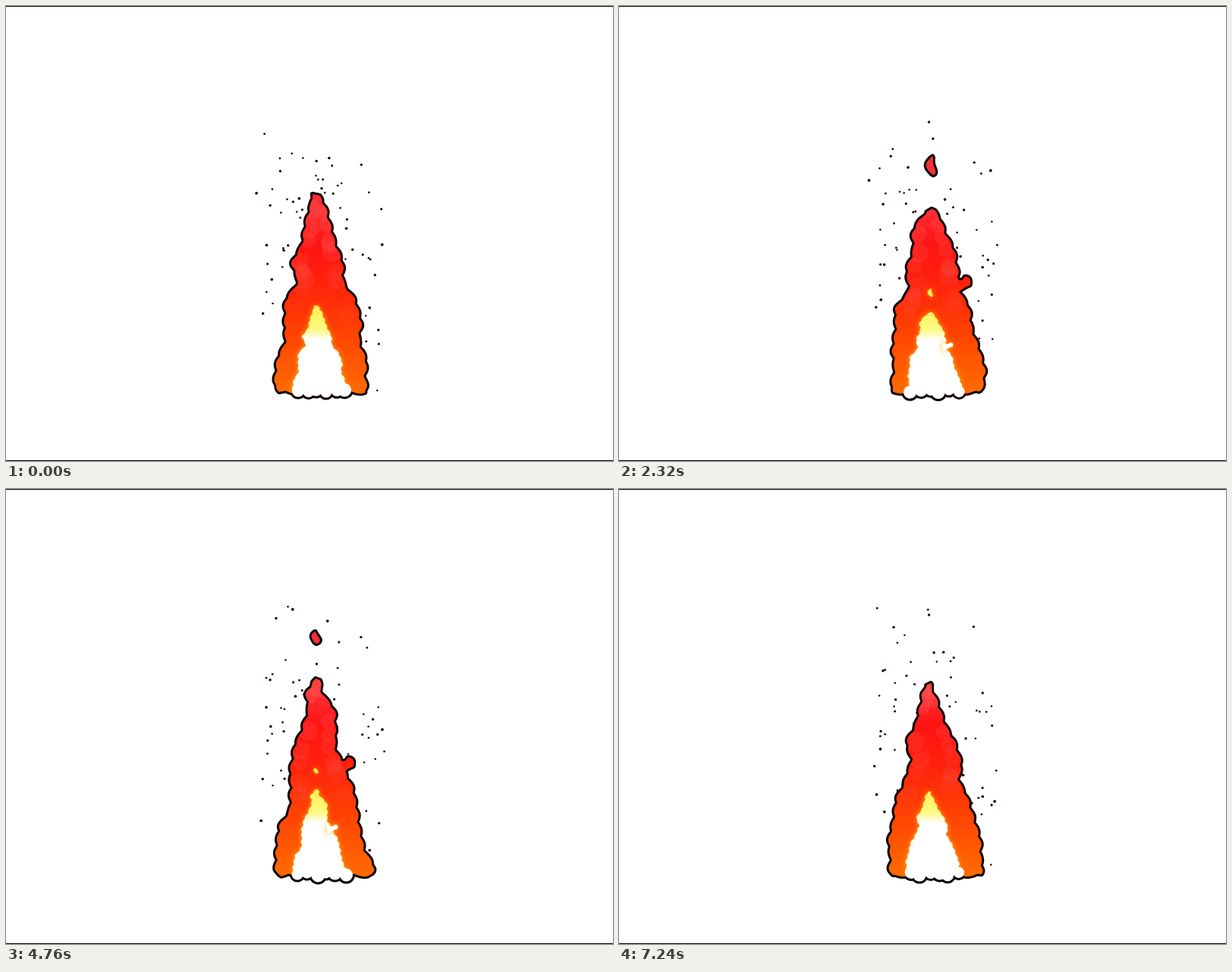
Animation, 800 px wide and 600 px high, one loop 7.28 s. Source, as an HTML page with a canvas:

```html
<!DOCTYPE html>
<html lang="en">
<head>
<meta charset="utf-8">
<title>Flame</title>
<style>
  html, body { margin: 0; width: 100%; height: 100%; overflow: hidden; background: #fff; }
  canvas { display: block; }
</style>
</head>
<body>
<canvas id="stage" width="800" height="600"></canvas>
<script>
const ctx = document.getElementById('stage').getContext('2d');
const LOOP = 7280, STEP = 40, RISE = 0.13, BASE = 511;

// Highest point of the flame, and the height of the lick that has just left it.
const keys = [
  { time: 0, x: 404, y: 246, lick: 0 },
  { time: 1640, x: 411, y: 254, lick: 16 },
  { time: 3040, x: 413, y: 268, lick: 64 },
  { time: 3880, x: 411, y: 264, lick: 54 },
  { time: 4760, x: 408, y: 248, lick: 16 },
  { time: 6000, x: 402, y: 239, lick: 0 },
  { time: 7240, x: 401, y: 206, lick: 0 }
];

let seed = 41;
const rand = () => (seed = (seed * 16807) % 2147483647) / 2147483647;
const clamp = (v, a, b) => Math.min(b, Math.max(a, v));
const mix = (a, b, u) => a + (b - a) * u;
const ease = u => u * u * (3 - 2 * u);
const hash = n => { const v = Math.sin(n * 127.1) * 43758.5; return v - Math.floor(v); };
const noise = x => {
  const i = Math.floor(x);
  return mix(hash(i), hash(i + 1), ease(x - i)) * 2 - 1;
};

// A lick leaves with every key, and a small one halfway between two keys.
const licks = keys.flatMap((k, i) => {
  const next = keys[i + 1];
  const own = { time: k.time, x: k.x, y: k.y - 22 - k.lick / 2 - (k.lick < 20 ? 22 : 0), h: k.lick };
  return next ? [own, { time: (k.time + next.time) / 2, x: (k.x + next.x) / 2, y: 208, h: 26 }] : [own];
}).filter(l => l.h);

const sparks = Array.from({ length: 64 }, () => {
  const x = 335 + rand() * 164;
  const high = x > 374 && x < 445;
  return {
    x, top: high ? 118 + rand() * 110 : 135 + rand() * 190,
    rise: 120 + rand() * 120, life: 1200 + rand() * 1200,
    phase: rand(), size: 1.2 + rand() * 0.7, sway: rand() * 6
  };
});
const patches = Array.from({ length: 16 }, (_, i) => ({
  side: i % 2 ? 0.84 : 0.16, phase: rand(), r: 9 + rand() * 6
}));

function flameAt(t) {
  const i = clamp(keys.findIndex(k => k.time > t) - 1, 0, keys.length - 2);
  const a = keys[i], b = keys[i + 1];
  const raw = clamp((t - a.time) / (b.time - a.time), 0, 1), u = ease(raw);
  const tipX = mix(a.x, b.x, u);
  const tipY = mix(a.y, b.y, u) + 20 * Math.sin(Math.PI * raw) * Math.sin(t / 150);

  const edge = (out, y) => {
    const s = (BASE - y) / 262;
    const half = Math.max(8, 66 * Math.max(0, 1 - s) ** 0.7);
    const flow = y + RISE * t;
    const bulge = noise(flow / 26 + out * 50) * Math.min(7, 1 + half * 0.2);
    const lobe = 3.2 * Math.abs(Math.sin(flow * Math.PI / 19 + out)) - 4;
    const sway = 6 * noise(flow / 24) * clamp(s - 0.55, 0, 1) * 2;
    const corner = 6 * clamp((y - 499) / 12, 0, 1) ** 2;
    const x = 419 - 11 * s + sway + out * (half + bulge + lobe - corner);
    return mix(tipX + out * 2, x, Math.sqrt(clamp((y - tipY) / 16, 0, 1)));
  };
  return { tipX, tipY, left: y => edge(-1, y), right: y => edge(1, y) };
}

function bodyPath(f, t) {
  const p = new Path2D();
  const top = f.tipY + 4;
  p.moveTo(f.tipX, f.tipY + 2);
  for (let y = top; y < BASE - 2; y += 2.5) p.lineTo(f.right(y), y);
  for (let x = f.right(BASE); x > f.left(BASE); x -= 3)
    p.lineTo(x, 507 + 4 * Math.abs(Math.sin((x + t / 60) / 9)));
  for (let y = BASE - 2; y > top; y -= 2.5) p.lineTo(f.left(y), y);
  p.closePath();
  return p;
}

function lickPath(l, t) {
  const dt = t - l.time, scale = 1 - Math.abs(dt) / 480;
  if (scale < 0.1) return null;
  const h = l.h * scale, half = (5 + l.h * 0.06) * scale;
  const p = new Path2D();
  const side = (out, k) => p.lineTo(
    l.x + 0.1 * h * Math.sin(k * 5 + l.time) + out * half * Math.sin(Math.PI * k) ** 0.6 * (0.55 + 0.5 * k),
    l.y - RISE * dt + h * (k - 0.5));
  for (let k = 0; k <= 1; k += 0.05) side(1, k);
  for (let k = 1; k >= 0; k -= 0.05) side(-1, k);
  p.closePath();
  return p;
}

// A hooked tongue that curls off the right flank together with a lick.
function curlPath(l, f, t) {
  const dt = t - l.time, scale = 1 - Math.abs(dt) / 480;
  if (scale < 0.1) return null;
  const y = 358 - RISE * dt, x = f.right(y) - 4;
  const at = (dx, dy) => [x + dx * scale, y + dy * scale];
  const p = new Path2D();
  p.moveTo(...at(-6, -8));
  p.quadraticCurveTo(...at(8, 8), ...at(13, -4));
  p.quadraticCurveTo(...at(23, -4), ...at(20, 8));
  p.quadraticCurveTo(...at(8, 12), ...at(-4, 26));
  p.closePath();
  return p;
}

function footPath(i, t) {
  const p = new Path2D();
  p.arc(385 + i * 12.4 + 1.5 * Math.sin(t / 210 + i * 2), 507.5 + 2 * Math.sin(t / 170 + i * 2.4),
    8 + Math.sin(t / 260 + i * 4), 0, 7);
  return p;
}

function ramp(y0, y1, stops) {
  const g = ctx.createLinearGradient(0, y0, 0, y1);
  stops.forEach(([y, c]) => g.addColorStop((y - y0) / (y1 - y0), c));
  return g;
}
const fire = ramp(180, 515, [[180, '#f03038'], [270, '#ff2d33'], [312, '#ff1313'],
  [365, '#ff220c'], [425, '#ff4003'], [515, '#ff6e00']]);
const core = ramp(360, 515, [[360, '#ffe648'], [400, '#fff25a'], [427, '#fff885'],
  [440, '#fff'], [515, '#fff']]);
const shrink = new DOMMatrix().translate(409, 515).scale(0.58, 0.45).translate(-409, -515);

function drawSparks(t) {
  ctx.fillStyle = '#26040a';
  for (const s of sparks) {
    const p = (t / s.life + s.phase) % 1;
    ctx.beginPath();
    ctx.arc(s.x + s.sway * Math.sin(p * 5), s.top + s.rise * (1 - p), s.size, 0, 7);
    ctx.fill();
  }
}

function drawPatches(f, t) {
  for (const c of patches) {
    const p = (t / 1300 + c.phase) % 1;
    const y = 410 - 150 * p;
    if (y < f.tipY + 8) continue;
    ctx.fillStyle = `rgba(255,80,74,${0.1 + 0.25 * p})`;
    ctx.beginPath();
    ctx.arc(mix(f.left(y), f.right(y), c.side), y, c.r, 0, 7);
    ctx.fill();
  }
}

function draw(t) {
  const f = flameAt(t);
  const body = bodyPath(f, t);
  const loose = licks.flatMap(l => [lickPath(l, t), curlPath(l, f, t)]);
  const shapes = [body, ...loose.filter(Boolean)];
  const feet = Array.from({ length: 6 }, (_, i) => footPath(i, t));

  ctx.fillStyle = '#fff';
  ctx.fillRect(0, 0, 800, 600);
  ctx.fillStyle = '#000';
  ctx.fillRect(0, 0, 800, 1);
  ctx.fillRect(0, 599, 800, 1);
  drawSparks(t);

  ctx.lineJoin = 'round';
  ctx.strokeStyle = '#0c0204';
  ctx.lineWidth = 6;
  [...shapes, ...feet].forEach(p => ctx.stroke(p));
  ctx.fillStyle = fire;
  shapes.forEach(p => ctx.fill(p));

  ctx.save();
  ctx.clip(body);
  drawPatches(f, t);
  ctx.fillStyle = core;
  ctx.shadowColor = '#ffb000';
  ctx.shadowBlur = 6;
  for (const p of shapes) {
    const inner = new Path2D();
    inner.addPath(p, shrink);
    ctx.fill(inner);
  }
  ctx.restore();

  ctx.fillStyle = '#fff';
  feet.forEach(p => ctx.fill(p));
}

const start = performance.now();
function tick() {
  const t = (performance.now() - start) % LOOP;
  draw(Math.floor(t / STEP) * STEP);
  requestAnimationFrame(tick);
}
tick();
</script>
</body>
</html>
```
